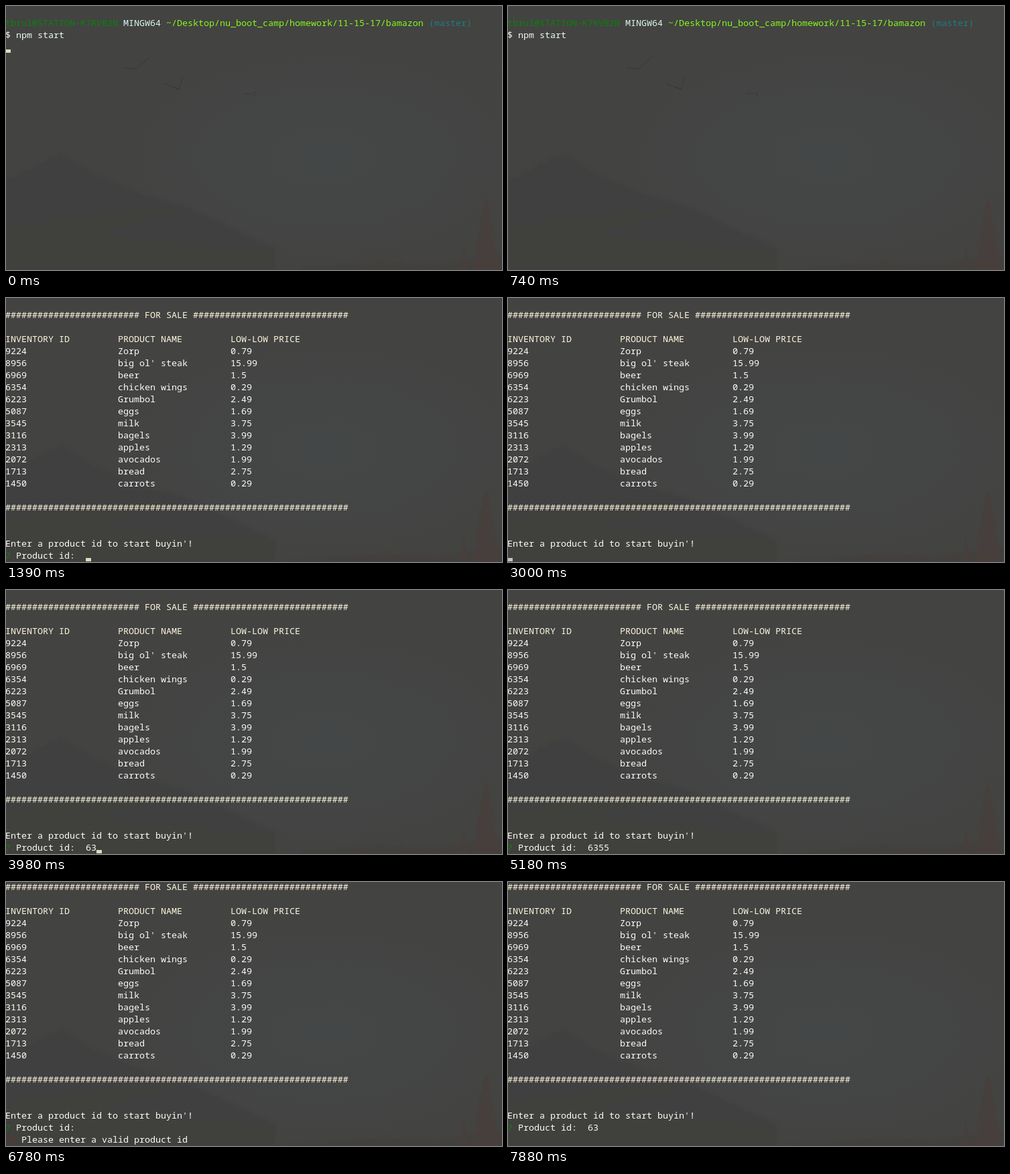
Write an HTML page that moves like this. It is 740 px wide and 395 px high and loops after 8000 ms.

```html
<!DOCTYPE html>
<html lang="en">
<head>
<meta charset="utf-8">
<title>Terminal shop</title>
<style>
  html, body { margin: 0; width: 100%; height: 100%; overflow: hidden; background: #434341; }
  svg { display: block; width: 740px; height: 395px; }
  text { font: 13.3333px "Noto Sans Mono", "DejaVu Sans Mono", monospace; white-space: pre; }
</style>
</head>
<body>
<svg viewBox="0 0 740 395" xmlns="http://www.w3.org/2000/svg">
  <defs>
    <radialGradient id="haze" cx="64%" cy="57%" r="50%">
      <stop offset="0" stop-color="#444747"/>
      <stop offset="1" stop-color="#444747" stop-opacity="0"/>
    </radialGradient>
    <filter id="soft"><feGaussianBlur stdDeviation="2"/></filter>
  </defs>
  <rect width="740" height="395" fill="#434341"/>
  <rect width="740" height="395" fill="url(#haze)"/>
  <g filter="url(#soft)">
    <path d="M0 262 82 219 130 250 205 282 270 300 400 362V395H0Z" fill="#41413f"/>
    <path d="M0 330 180 305 260 306 130 340 300 358 402 364V395H0Z" fill="#403f3d"/>
    <path d="M400 395 560 382 640 386 740 372V395Z" fill="#42403e"/>
  </g>
  <path d="M717 285 724 312 720 312 731 345 724 344 737 382 740 395H694L704 358 698 360 709 328 704 330 713 306 709 307Z
           M683 355 690 395H676Z" fill="#483f3c" opacity=".8"/>
  <g id="birds" fill="none" stroke="#383937">
    <path id="firstBird" d="M176 93 195 94 215 76"/>
    <path d="M236 116 248 121 258 125 263 107M250 121 258 124"/>
    <path d="M354 131H368M371 128V136"/>
  </g>
  <g id="screen"></g>
  <rect id="cursor" width="8" height="5"/>
</svg>
<script>
const LOOP = 8000, CELL = 8, LINE = 18;
const WHITE = '#fbfdf9', CREAM = '#fdf7df', GREEN = '#0b870b', RED = '#7c2424';
const byId = id => document.getElementById(id);
const screen = byId('screen'), cursor = byId('cursor');

const products = [
  ['9224', 'Zorp', '0.79'], ['8956', "big ol' steak", '15.99'], ['6969', 'beer', '1.5'],
  ['6354', 'chicken wings', '0.29'], ['6223', 'Grumbol', '2.49'], ['5087', 'eggs', '1.69'],
  ['3545', 'milk', '3.75'], ['3116', 'bagels', '3.99'], ['2313', 'apples', '1.29'],
  ['2072', 'avocados', '1.99'], ['1713', 'bread', '2.75'], ['1450', 'carrots', '0.29']
];

// Each run is [row, column, text, colour].
const command = [
  [1, 0, 'tbrul@STATION-K7RVB2N', '#0d800d'],
  [1, 22, 'MINGW64', '#d8f6f1'],
  [1, 30, '~/Desktop/nu_boot_camp/homework/11-15-17/bamazon', '#84f81c'],
  [1, 79, '(master)', '#1b7f7f'],
  [2, 0, '$ npm start', '#eefaf4']
];
const launch = [
  ...command,
  [4, 0, '> bamazon@1.0.0 start C:\\Users\\tbrul\\Desktop\\nu_boot_camp\\homework\\11-15-17\\bamazon', WHITE],
  [5, 0, '> node bamazonCustomer.js', WHITE]
];
const columns = (row, cells, color) => cells.map((cell, i) => [row, i * 21, cell, color]);
const table = [
  [1, 0, '#'.repeat(25) + ' FOR SALE ' + '#'.repeat(29), CREAM],
  ...columns(3, ['INVENTORY ID', 'PRODUCT NAME', 'LOW-LOW PRICE'], CREAM),
  ...products.flatMap((product, i) => columns(4 + i, product, WHITE)),
  [17, 0, '#'.repeat(64), CREAM],
  [20, 0, "Enter a product id to start buyin'!", WHITE]
];
const prompt = typed => [
  ...table,
  [21, 0, '?', GREEN],
  [21, 2, 'Product id:  ' + typed, WHITE]
];
const scrolled = typed => prompt(typed).map(([row, ...rest]) => [row - 1, ...rest]);
const rejected = [
  ...scrolled(''),
  [21, 0, '>>', RED],
  [21, 3, 'Please enter a valid product id', WHITE]
];

const LIT = '#dcdcc0', GREY = '#c4c4c4';
const at = (row, col, color = LIT) => ({ row, col, color });
const steps = [
  [0, command, at(3, 0)],
  [460, command],
  [820, launch, at(7, 0, GREY)],
  [1390, prompt(''), at(21, 15)],
  [1490, prompt('')],
  [2040, prompt(''), at(21, 15)],
  [2620, prompt('')],
  [3000, table, at(21, 0, GREY)],
  [3100, prompt('6')],
  [3280, prompt('64'), at(21, 17)],
  [3680, prompt('64')],
  [3780, prompt('6'), at(21, 16)],
  [3980, prompt('63'), at(21, 17)],
  [4180, prompt('63')],
  [4710, prompt('635')],
  [4880, prompt('6355'), at(21, 19)],
  [5180, prompt('6355')],
  [5480, rejected, at(20, 15)],
  [5780, rejected],
  [6280, rejected, at(20, 15)],
  [6780, rejected],
  [6980, scrolled('6'), at(20, 16)],
  [7380, scrolled('6')],
  [7480, scrolled('63'), at(20, 17)],
  [7880, scrolled('63')]
];

function textRun([row, col, content, color]) {
  const node = document.createElementNS('http://www.w3.org/2000/svg', 'text');
  node.setAttribute('x', col * CELL - 1);
  node.setAttribute('y', row * LINE + 12);
  node.setAttribute('fill', color);
  node.textContent = content;
  return node;
}

let shown;
function draw(time) {
  const step = steps.findLast(([start]) => start <= time);
  if (step === shown) return;
  shown = step;
  const [, runs, caret] = step;
  screen.replaceChildren(...runs.map(textRun));
  cursor.style.display = caret ? '' : 'none';
  if (caret) {
    cursor.setAttribute('x', caret.col * CELL - 1);
    cursor.setAttribute('y', caret.row * LINE + 11);
    cursor.setAttribute('fill', caret.color);
  }
  byId('firstBird').style.display = runs === command ? '' : 'none';
  byId('birds').style.opacity = runs === command || runs === launch ? 1 : 0.2;
}

const began = performance.now();
function tick() {
  draw((performance.now() - began) % LOOP);
  requestAnimationFrame(tick);
}
tick();
</script>
</body>
</html>
```
